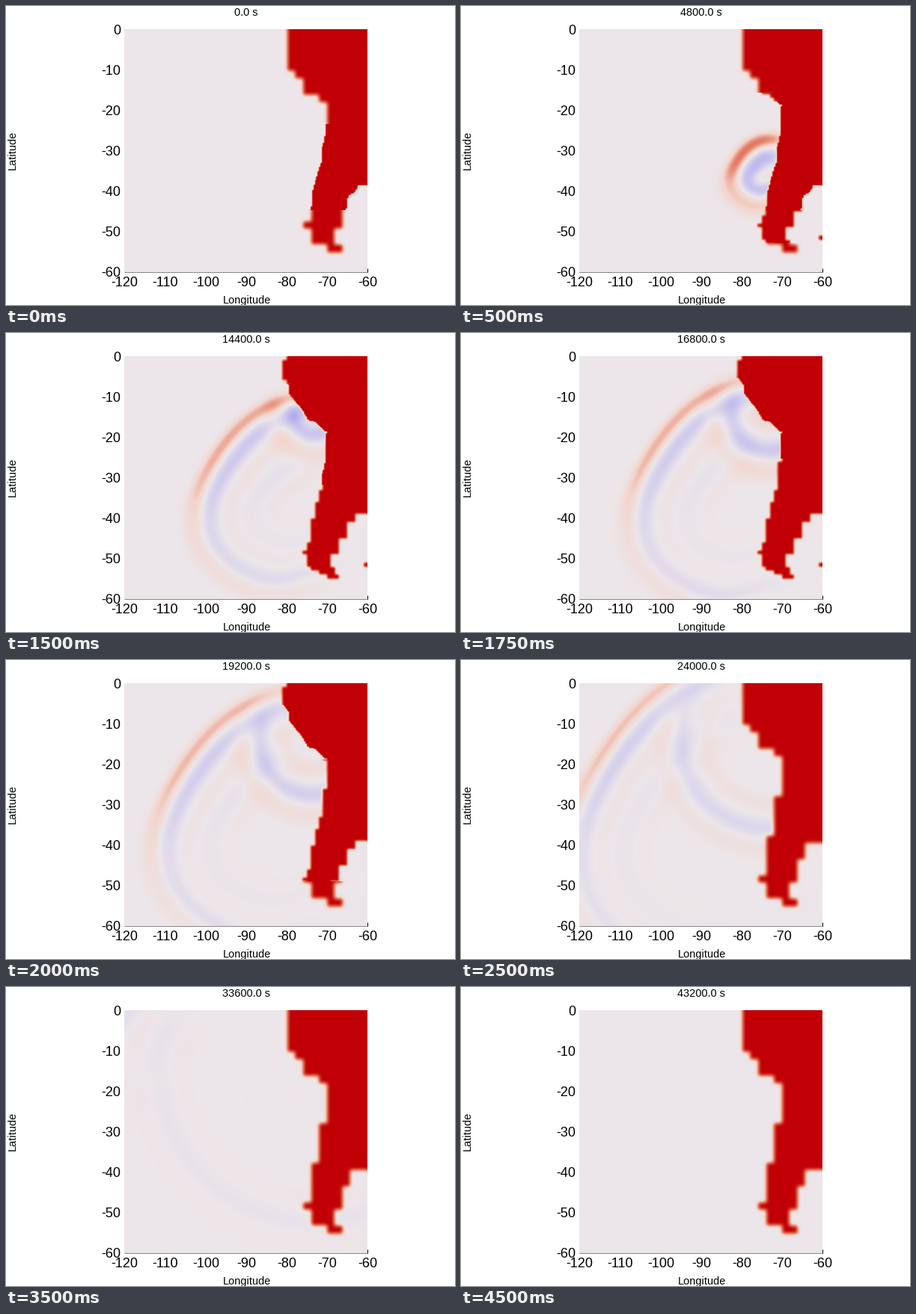
A matplotlib script for the animation above (4750 ms loop, 600 by 400 pixels).

```python
import numpy as np
import matplotlib.pyplot as plt
from matplotlib.animation import FuncAnimation
from matplotlib.colors import LinearSegmentedColormap
from matplotlib.lines import Line2D
from matplotlib.path import Path

W, H, DPI = 600, 400, 100
LEFT, TOP, SIZE = 158, 31, 325
STEPS, INTERVAL = 19, 250

plt.rcParams["font.family"] = "Liberation Sans"

# Water height: blue below zero, pink above, solid red for land.
STOPS = [
    (-1.0, (70, 60, 240)), (-0.4, (184, 180, 238)), (0.0, (236, 230, 234)),
    (0.2, (243, 212, 203)), (0.45, (232, 145, 125)), (0.65, (220, 98, 72)),
    (1.0, (192, 0, 6)),
]
CMAP = LinearSegmentedColormap.from_list(
    "height", [((v + 1) / 2, np.array(c) / 255) for v, c in STOPS], N=512)

# Key points of the shore, from the north-west round to the east.
COAST = [
    (376, 0), (371.5, 38), (371.5, 62), (378, 70), (379, 82), (388, 93),
    (398, 107), (403, 116), (414, 120), (428, 133), (426, 177), (422, 190),
    (421, 208), (413, 235), (410, 244), (408, 268), (403, 284), (398.5, 293),
    (403, 302), (403, 312), (424, 324), (440, 333), (450, 324), (440, 322),
    (435, 308), (437, 297), (449, 291), (445, 284), (447, 277), (454.5, 274),
    (456, 264), (457, 254), (465, 250), (471, 241), (520, 241), (520, 0),
]
ISLAND = [(477, 306), (520, 306), (520, 312), (477, 312)]

X, Y = np.meshgrid(LEFT + 0.5 + np.arange(SIZE), TOP + 0.5 + np.arange(SIZE))


def smooth(a, width, axis):
    kernel = np.hanning(width + 2)[1:-1]
    kernel /= kernel.sum()

    def run(line):
        return np.convolve(np.pad(line, width // 2, mode="edge"), kernel, "valid")
    return np.apply_along_axis(run, axis, a)


def land(cell, blur, x0=LEFT, y0=TOP):
    """Coverage of land sampled on square cells, softly edged."""
    cx = x0 + (np.floor((X - x0) / cell) + 0.5) * cell
    cy = y0 + (np.floor((Y - y0) / cell) + 0.5) * cell
    points = np.column_stack([cx.ravel(), cy.ravel()])
    inside = np.zeros(X.size, bool)
    for outline in (COAST, ISLAND):
        inside |= Path(outline + outline[:1]).contains_points(points)
    mask = inside.reshape(X.shape).astype(float)
    return smooth(smooth(mask, blur, 0), blur, 1)


COARSE = land(10.57, 13, 164.5, 34)
MEDIUM = land(SIZE / 60, 7)
FINE = land(SIZE / 180, 3)


def coast(n):
    """The grid is refined where the wave meets the shore."""
    mask = COARSE
    if n < 10:
        medium = (Y > 160 - 22 * n) & (Y < min(273 + 22 * n, 760 - 58 * n))
        fine = (Y > max(60, 158 - 15 * n)) & (Y < min(273, 413 - 35 * n))
        mask = np.where(fine, FINE, np.where(medium, MEDIUM, COARSE))
    return mask


def polar(cx, cy):
    """Distance, and angle in degrees from west with north positive."""
    dx, dy = cx - X, cy - Y
    return np.hypot(dx, dy), np.degrees(np.arctan2(dy, dx))


def rise(x):
    return 1 / (1 + np.exp(-x))


def ridge(offset, width):
    return np.exp(-(offset / width) ** 2)


R1, A1 = polar(415, 226)
R2, A2 = polar(411, 109)
# Fastest over deep water to the west, slowest along the southern shore.
SPEED = 23.9 + 4.4 * ridge(A1 + 17, 32) - 5 * rise(-(A1 + 72) / 7)
NORTH = rise((A1 + 2) / 8)


def main_wave(n):
    s = R1 - SPEED * n
    amp = min(0.6, 0.95 / np.sqrt(n)) * np.clip((17 - n) / 6, 0, 1)
    amp = amp * rise((110 - 4 * n - abs(A1)) / 10)
    amp = amp * np.exp(-0.12 * n * (1 - NORTH))
    crest = (0.5 + 0.45 * NORTH) * ridge(s, 14 - 5 * NORTH)
    trough = 0.6 * ridge(s + 24, 11)
    wake = 0.15 * ridge(s + 52, 13) - 0.12 * ridge(s + 82, 14)
    wake += 0.12 * ridge(s + 108, 14)
    return amp * (crest - trough + wake)


def reflected_wave(n):
    if n < 5:
        return 0
    s = R2 - (26 + 22.5 * (n - 6))
    amp = 0.28 * np.exp(-0.2 * abs(n - 6)) * np.clip((18 - n) / 7, 0, 1)
    shape = 0.5 * ridge(s - 28, 14) - ridge(s, 12) + 0.5 * ridge(s + 34, 12)
    return amp * rise((25 - A2) / 8) * shape


def height(n):
    mask = coast(n)
    water = main_wave(n) + reflected_wave(n) if n else 0
    return np.clip(water * (1 - mask) + mask, -1, 1)


fig = plt.figure(figsize=(W / DPI, H / DPI), dpi=DPI, facecolor="white")
ax = fig.add_axes([LEFT / W, 1 - (TOP + SIZE) / H, SIZE / W, SIZE / H])
ax.axis("off")
image = ax.imshow(height(0), cmap=CMAP, vmin=-1, vmax=1,
                  interpolation="nearest", aspect="auto")


def label(x, y, text, px, ha="center", **kw):
    return fig.text(x / W, 1 - y / H, text, fontsize=px * 72 / DPI, color="black",
                    ha=ha, va="baseline", **kw)


def line(x0, y0, x1, y1, color):
    fig.add_artist(Line2D([x0 / W, x1 / W], [1 - y0 / H, 1 - y1 / H],
                          color=color, lw=0.72, solid_capstyle="butt"))


for i in range(7):
    at = i * SIZE / 6
    label(153, TOP + at + 6.5, str(-10 * i), 18, ha="right")
    label(LEFT + at + 0.5, 375, str(10 * i - 120), 18)

line(LEFT, 355.5, LEFT + SIZE, 355.5, "#8c8688")
line(482.5, 351, 482.5, 356, "black")

title = label(321, 13, "0.0 s", 14.5)
label(321.5, 398, "Longitude", 14.5)
label(13, 193, "Latitude", 14.5, rotation=90, rotation_mode="anchor")


def update(n):
    image.set_data(height(n))
    title.set_text(f"{2400 * n:.1f} s")
    return image, title


anim = FuncAnimation(fig, update, frames=STEPS, interval=INTERVAL,
                     repeat=True, repeat_delay=0, blit=False)
plt.show()
```
